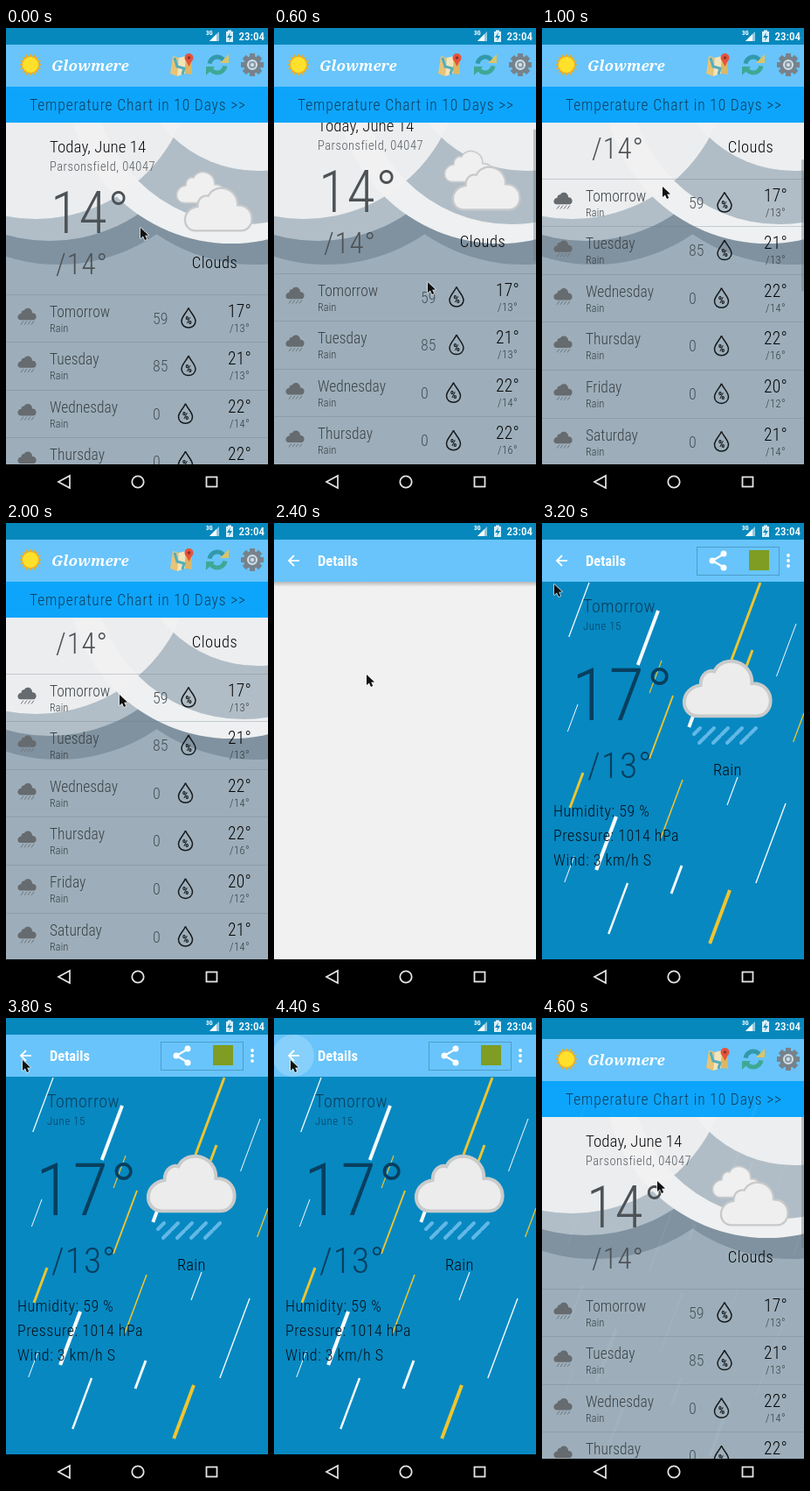
These frames come from a looping animation (300 by 533 pixels, 4800 ms). An HTML page with a canvas:

```html
<!DOCTYPE html>
<html lang="en">
<head>
<meta charset="utf-8">
<title>Weather app</title>
<style>
html, body { margin: 0; width: 300px; height: 533px; overflow: hidden; background: #000; }
canvas { display: block; }
</style>
</head>
<body>
<canvas id="stage" width="300" height="533"></canvas>
<script>
const c = document.getElementById('stage').getContext('2d');
const LOOP = 4800, STEP = 200, NAV_TOP = 498;
const BODY = '"Roboto Condensed", Roboto, sans-serif';
const ROWS = [
  ['Tomorrow', 59, 17, 13], ['Tuesday', 85, 21, 13], ['Wednesday', 0, 22, 14],
  ['Thursday', 0, 22, 16], ['Friday', 0, 20, 12], ['Saturday', 0, 21, 14]
];
// x, y of the upper end, drop height, line width
const WHITE_RAIN = [
  [54, 68, 62, 1.3], [133, 100, 62, 4], [41, 207, 31, 1], [291, 115, 60, 1],
  [224, 290, 32, 1.2], [279, 320, 91, 1.4], [98, 411, 58, 2.4], [160, 391, 32, 3],
  [85, 335, 61, 4.2], [175, 215, 18, 4], [37, 380, 30, 1]
];
const GOLD_RAIN = [
  [250, 68, 88, 3], [241, 145, 18, 3], [137, 157, 37, 1.2], [150, 197, 72, 2],
  [47, 285, 40, 3], [161, 293, 67, 1.5], [215, 419, 61, 4], [300, 217, 33, 1.3]
];
// time, x, y
const POINTER = [
  [0, 154, 228], [200, 168, 262], [400, 184, 314], [600, 176, 290], [800, 150, 206],
  [1000, 138, 181], [1200, 130, 196], [2000, 130, 196], [2200, 117, 183], [2400, 106, 173],
  [2800, 106, 172], [3000, 66, 120], [3200, 14, 70], [3400, 12, 60], [3600, 19, 48],
  [4400, 19, 48], [4600, 132, 186]
];
const SCROLL = [[400, 0], [600, 24], [800, 108], [1000, 132]];

function track(keys, t, n) {
  let i = 0;
  while (i < keys.length - 1 && keys[i + 1][0] <= t) i++;
  const a = keys[i], b = keys[Math.min(i + 1, keys.length - 1)];
  const k = b === a ? 0 : Math.max(0, (t - a[0]) / (b[0] - a[0]));
  return a[n] + (b[n] - a[n]) * k;
}

function rect(x, y, w, h, color) {
  c.fillStyle = color;
  c.fillRect(x, y, w, h);
}

function disc(x, y, r, color) {
  c.fillStyle = color;
  c.beginPath();
  c.arc(x, y, r, 0, 7);
  c.fill();
}

function ring(x, y, r, color, w) {
  c.strokeStyle = color;
  c.lineWidth = w;
  c.beginPath();
  c.arc(x, y, r, 0, 7);
  c.stroke();
}

function path(points, closed) {
  c.beginPath();
  points.forEach(([x, y], i) => i ? c.lineTo(x, y) : c.moveTo(x, y));
  if (closed) c.closePath();
}

function poly(points, color) {
  path(points, true);
  c.fillStyle = color;
  c.fill();
}

function line(points, color, w) {
  path(points);
  c.strokeStyle = color;
  c.lineWidth = w;
  c.stroke();
}

function text(s, x, y, size, color, opt = {}) {
  c.font = `${opt.style || 'normal'} ${opt.weight || 300} ${size}px ${opt.font || BODY}`;
  c.fontStretch = opt.wide ? 'normal' : 'condensed';
  c.letterSpacing = (opt.space || 0) + 'px';
  c.textAlign = opt.align || 'left';
  c.fillStyle = color;
  c.fillText(s, x, y);
}

// Cloud centred on x, y; about 100 wide and 64 high at scale 1.
function cloud(x, y, k, fill, stroke, w) {
  c.save();
  c.translate(x, y);
  c.scale(k, k);
  c.beginPath();
  c.moveTo(-34, 32);
  c.bezierCurveTo(-55, 32, -57, 0, -31, -4);
  c.bezierCurveTo(-31, -19, -20, -22, -15, -20);
  c.bezierCurveTo(-5, -41, 30, -33, 29, -6);
  c.bezierCurveTo(57, -7, 57, 32, 34, 32);
  c.closePath();
  c.fillStyle = fill;
  c.fill();
  if (stroke) {
    c.strokeStyle = stroke;
    c.lineWidth = w;
    c.stroke();
  }
  c.restore();
}

function smallRain(x, y) {
  cloud(x, y - 3, 0.21, '#666b6f');
  for (let i = 0; i < 4; i++) {
    line([[x - 4 + i * 4, y + 5], [x - 7 + i * 4, y + 9]], '#6b747b', 1);
  }
}

function humidity(x, y) {
  c.strokeStyle = '#15191c';
  c.lineWidth = 1.5;
  c.beginPath();
  c.moveTo(x, y - 11);
  c.bezierCurveTo(x + 2, y - 6, x + 8, y - 1, x + 8, y + 4);
  c.bezierCurveTo(x + 8, y + 14, x - 8, y + 14, x - 8, y + 4);
  c.bezierCurveTo(x - 8, y - 1, x - 2, y - 6, x, y - 11);
  c.stroke();
  text('%', x, y + 7.5, 12, '#15191c', { weight: 700, align: 'center' });
}

function statusBar() {
  rect(0, 0, 300, 25, '#0788bd');
  text('3G', 229, 8, 7, '#fff', { weight: 700 });
  poly([[233, 15], [244, 4], [244, 15]], '#8fcbe4');
  poly([[233, 15], [241, 7], [241, 15]], '#fff');
  rect(252, 4, 8, 12, '#d9f0fa');
  rect(254, 2.5, 4, 2, '#d9f0fa');
  poly([[257, 5], [253, 11], [256, 11], [255, 15], [259, 9], [256, 9]], '#0788bd');
  text('23:04', 296, 14, 13, '#fff', { weight: 500, align: 'right', wide: true });
}

function navBar(top) {
  rect(0, top, 300, 533 - top, '#000');
  c.strokeStyle = '#e4e4e4';
  c.lineWidth = 1.7;
  path([[60, 518], [73, 511], [73, 525]], true);
  c.stroke();
  ring(151, 518, 6.7, '#e4e4e4', 1.8);
  c.strokeRect(229.5, 512.5, 12, 11);
}

function sun(x, y) {
  const rays = [];
  for (let i = 0; i < 32; i++) {
    const r = i % 2 ? 9.5 : 13, a = i * Math.PI / 16;
    rays.push([x + r * Math.cos(a), y + r * Math.sin(a)]);
  }
  poly(rays, '#e9b02c');
  disc(x, y, 9, '#ffe02a');
}

function mapIcon(x, y) {
  poly([[x - 10, y - 10], [x - 3, y - 8], [x - 5, y + 13], [x - 13, y + 10]], '#e7c476');
  poly([[x - 3, y - 8], [x + 5, y - 10], [x + 4, y + 10], [x - 5, y + 13]], '#f4e4b9');
  poly([[x + 5, y - 10], [x + 11, y - 8], [x + 12, y + 11], [x + 4, y + 10]], '#ddb765');
  line([[x - 8, y - 8], [x - 5, y + 2], [x + 3, y + 4], [x + 1, y + 11]], '#55aebc', 3);
  poly([[x + 4, y - 7], [x + 13, y - 7], [x + 8.5, y + 2]], '#e5533d');
  disc(x + 8.5, y - 8, 5, '#e5533d');
  disc(x + 8.5, y - 8, 1.8, '#8e3329');
}

function syncIcon(x, y) {
  for (const [turn, color, tip] of [[0, '#3299ab', '#d9c568'], [Math.PI, '#3fa894', '#3fa894']]) {
    c.save();
    c.translate(x, y);
    c.rotate(turn);
    c.strokeStyle = color;
    c.lineWidth = 5;
    c.beginPath();
    c.arc(0, 0, 9, 3.3, 5.7);
    c.stroke();
    poly([[3, -2], [13, -2], [13, -12]], tip);
    c.restore();
  }
}

function gear(x, y) {
  for (let i = 0; i < 8; i++) {
    c.save();
    c.translate(x, y);
    c.rotate(i * Math.PI / 4);
    rect(-3, -13, 6, 7, '#77828b');
    c.restore();
  }
  ring(x, y, 7.5, '#77828b', 5);
  ring(x, y, 5, '#d4e1e9', 2);
  disc(x, y, 4, '#8c9aa4');
  disc(x, y, 2, '#d4e1e9');
}

// Overlapping discs behind the list.
function backdrop() {
  rect(0, 108, 300, 390, '#9daeba');
  disc(60, 70, 200, '#8092a0');
  disc(285, 70, 200, '#8092a0');
  disc(50, 60, 183, '#b1bec7');
  disc(258, 58, 188, '#eef0f1');
  disc(272, 52, 172, '#b1bdc6');
  disc(288, 22, 141, '#eceef0');
  disc(34, 38, 180, 'rgba(241,242,243,.93)');
}

function today() {
  text('Today, June 14', 50, 142, 19, '#0d0f11');
  text('Parsonsfield, 04047', 50, 163, 14.5, '#555b60', { space: 0.5 });
  text('14°', 51, 234, 66, '#4d5256', { space: 0.5 });
  text('/14°', 57, 281, 33, '#4d5256', { space: 0.9 });
  text('Clouds', 239, 274, 18.5, '#050607', { align: 'center', space: 0.5 });
  cloud(223, 182, 0.55, '#f0f0f0', '#c9cbcc', 3);
  cloud(243, 207, 0.76, '#efefef', '#c7c9ca', 3);
}

function row([day, damp, high, low], top, pressed) {
  if (pressed) rect(0, top, 300, 54.6, 'rgba(90,105,115,.18)');
  rect(0, Math.round(top), 300, 1, 'rgba(100,118,130,.3)');
  smallRain(24, top + 26);
  text(day, 50, top + 26, 17.5, '#3c4246');
  text('Rain', 50, top + 43, 12, '#33393d', { space: 0.2 });
  text(damp, 168, top + 34, 18, '#485056');
  humidity(damp ? 209 : 205.5, top + 27);
  text(high + '°', 281, top + 26, 19.5, '#050607', { align: 'right', space: 0.2 });
  text('/' + low + '°', 279, top + 43, 12.5, '#33393d', { align: 'right', space: 0.4 });
}

function home(scroll, shift, bar, pressed) {
  c.save();
  c.translate(0, shift);
  c.beginPath();
  c.rect(0, 19, 300, NAV_TOP - 19);
  c.clip();
  backdrop();
  c.save();
  c.translate(0, -scroll);
  today();
  ROWS.forEach((r, i) => row(r, 303.5 + i * 54.6, pressed && i === 0));
  c.restore();
  if (bar) rect(297, 108 + scroll * 0.32, 3, 150, 'rgba(105,115,122,.4)');
  rect(0, 19, 300, 48, '#68c4fa');
  sun(28, 42);
  text('Glowmere', 52, 49, 17, '#fff', { font: '"Noto Serif", serif', weight: 600, style: 'italic', wide: true });
  mapIcon(201, 42);
  syncIcon(242, 42);
  gear(282, 42);
  rect(0, 67, 300, 41, '#0da5fb');
  text('Temperature Chart in 10 Days >>', 151, 94, 17.5, '#103f5e', { align: 'center', space: 0.85 });
  c.restore();
}

function detailBar() {
  rect(0, 19, 300, 48, '#68c4fa');
  line([[29, 43], [17, 43]], '#fff', 1.8);
  line([[23, 37], [17, 43], [23, 49]], '#fff', 1.8);
  text('Details', 50, 49, 16.5, '#fff', { weight: 600, wide: true });
}

function blank() {
  rect(0, 67, 300, 431, '#f1f1f1');
  const shade = c.createLinearGradient(0, 67, 0, 73);
  shade.addColorStop(0, 'rgba(0,0,0,.24)');
  shade.addColorStop(1, 'rgba(0,0,0,0)');
  rect(0, 67, 300, 6, shade);
  detailBar();
}

function rain(drops, color) {
  for (const [x, y, h, w] of drops) line([[x, y], [x - h * 0.375, y + h]], color, w);
}

function details(ripple) {
  rect(0, 67, 300, 431, '#0788c1');
  rain(WHITE_RAIN, '#f8fbfc');
  rain(GOLD_RAIN, '#f0c52f');
  const ink = '#073f5e', dark = '#03121b';
  text('Tomorrow', 47, 102, 20, ink, { space: 0.5 });
  text('June 15', 47, 122, 13, ink, { space: 0.5 });
  text('17°', 34, 225, 84, ink, { space: 1.5 });
  text('/13°', 52, 291, 41.5, ink, { space: 1 });
  text('Humidity: 59 %', 13, 335, 18, dark, { space: 0.5 });
  text('Pressure: 1014 hPa', 13, 363, 18, dark, { space: 0.5 });
  text('Wind: 3 km/h S', 13, 391, 18, dark, { space: 0.5 });
  cloud(212, 189, 0.98, '#ececec', '#c9cbcb', 4);
  c.lineCap = 'round';
  for (let i = 0; i < 5; i++) {
    const x = 181 + i * 16;
    line([[x, 234], [x - 7, 241]], '#62b8e7', 4);
    if (i < 4) line([[x + 7, 243], [x - 1, 251]], '#62b8e7', 4);
  }
  c.lineCap = 'butt';
  text('Rain', 196, 288, 18.5, '#030a0e', { space: 0.2 });

  detailBar();
  if (ripple) {
    c.save();
    c.beginPath();
    c.rect(0, 19, 300, 48);
    c.clip();
    disc(22, 43, ripple, 'rgba(255,255,255,.2)');
    c.restore();
  }
  c.strokeStyle = '#4d9dcb';
  c.lineWidth = 1;
  c.strokeRect(177.5, 27.5, 94, 32);
  line([[209, 35], [195, 43], [209, 51]], '#fff', 2.2);
  for (const [x, y] of [[208, 35], [195, 43], [208, 51]]) disc(x, y, 3.5, '#fff');
  rect(237, 31, 23, 23, '#7f9d22');
  for (const y of [37, 43, 49]) disc(282, y, 1.9, '#fff');
}

function pointer(x, y) {
  path([[x, y], [x, y + 12], [x + 3, y + 9.5], [x + 5, y + 14], [x + 7.2, y + 13],
    [x + 5.2, y + 8.8], [x + 9, y + 8.5]], true);
  c.lineJoin = 'round';
  c.strokeStyle = 'rgba(255,255,255,.75)';
  c.lineWidth = 1.6;
  c.stroke();
  c.fillStyle = '#111';
  c.fill();
  c.lineJoin = 'miter';
}

function faded(alpha, dy, draw) {
  c.save();
  c.globalAlpha = alpha;
  c.translate(0, dy);
  draw();
  c.restore();
}

function draw(t) {
  const closing = t >= 4600;
  const shift = closing ? 5 : 0;
  statusBar();
  if (t < 2400 || closing) {
    const scroll = closing ? 0 : track(SCROLL, t, 1);
    const bar = closing || (t >= 600 && t < 1400);
    home(scroll, shift, bar, t >= 1600 && t < 2000);
    if (t === 2200) faded(0.65, 12, blank);
    if (closing) {
      faded(0.05, 20, () => {
        rain(WHITE_RAIN, '#fff');
        rain(GOLD_RAIN, '#fff');
      });
    }
  } else if (t < 2600) {
    blank();
  } else {
    details(t >= 4200 ? 24 : t >= 4000 ? 18 : 0);
  }
  navBar(NAV_TOP + shift);
  pointer(track(POINTER, t, 1), track(POINTER, t, 2));
}

const start = performance.now();
function tick() {
  const t = (performance.now() - start) % LOOP;
  draw(Math.floor(t / STEP) * STEP);
  requestAnimationFrame(tick);
}
tick();
</script>
</body>
</html>
```
